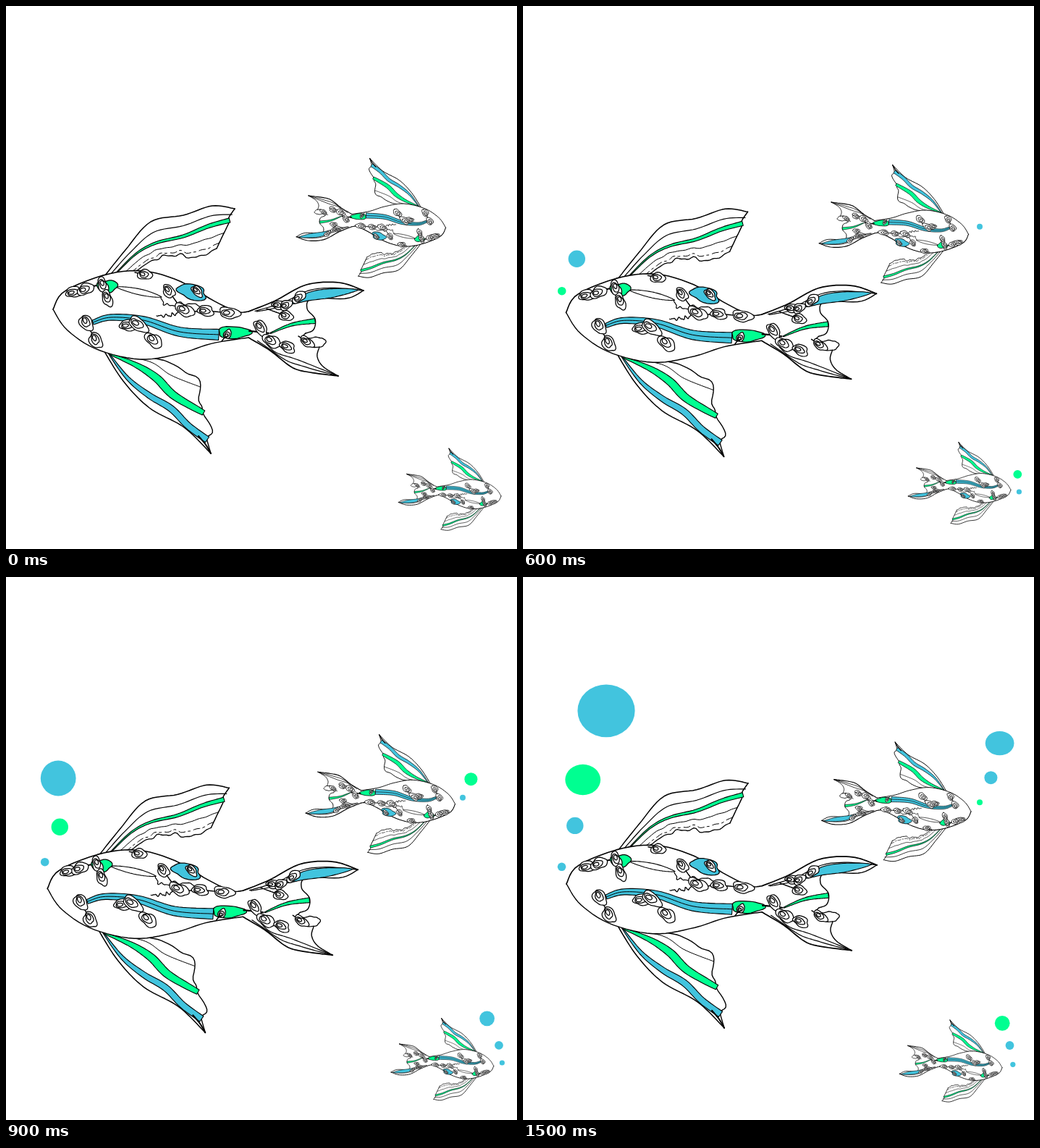
Write an HTML page that moves like this. It is 706 px wide and 750 px high and loops after 1.8 s.

```html
<!DOCTYPE html>
<html lang="en">
<head>
<meta charset="utf-8">
<title>Three fish</title>
<style>
  html, body { margin: 0; width: 100%; height: 100%; overflow: hidden; background: #fff; }
  svg { display: block; width: 706px; height: 750px; }
  path { stroke-width: calc(var(--w) * var(--bold, 1) * 1px); }
</style>
</head>
<body>
<svg id="stage" viewBox="0 0 706 750">
  <defs><g id="fish" stroke="#000" stroke-linecap="round" stroke-linejoin="round"></g></defs>
</svg>
<script>
const BLUE = '#42c4de', GREEN = '#00ff91', WHITE = '#fff';
const STEP = 300, COUNT = 6;
const { PI, sin, cos, min, max, floor, hypot } = Math;
const stage = document.getElementById('stage');
const fish = document.getElementById('fish');

function add(parent, tag, attrs) {
  const el = document.createElementNS('http://www.w3.org/2000/svg', tag);
  for (const key in attrs) el.setAttribute(key, attrs[key]);
  return parent.appendChild(el);
}

// Spline through a few key points, as a function of t in 0..1.
function curve(text) {
  const n = text.split(' ').map(Number), p = [];
  for (let i = 0; i < n.length; i += 2) p.push([n[i], n[i + 1]]);
  return t => {
    const u = t * (p.length - 1), i = min(floor(u), p.length - 2), s = u - i;
    const b = p[i], c = p[i + 1], a = p[i - 1] || b, d = p[i + 2] || c;
    return b.map((v, k) => v + s / 2 * (c[k] - a[k]
      + s * (2 * a[k] - 5 * v + 4 * c[k] - d[k] + s * (3 * (v - c[k]) + d[k] - a[k]))));
  };
}

function slope(f, t) {
  const [a, b] = f(max(0, t - .01)), [c, d] = f(min(1, t + .01));
  return [c - a, d - b];
}

// Shift a curve sideways by dist(t).
const offset = (f, dist) => t => {
  const [x, y] = f(t), [dx, dy] = slope(f, t), k = dist(t) / (hypot(dx, dy) || 1);
  return [x - dy * k, y + dx * k];
};
const mix = (f, g, k) => t => f(t).map((v, i) => v + (g(t)[i] - v) * k);
const ruffle = (f, size) => offset(f, t => size * sin(PI * t) * (sin(31 * t) + .6 * sin(53 * t)));
const trace = (f, n = 40) =>
  Array.from({ length: n + 1 }, (_, i) => f(i / n).map(v => v.toFixed(1)).join(' '));

const draw = (points, fill = 'none', width = 1.2, extra = {}) =>
  add(fish, 'path', { d: 'M' + points.join('L') + (fill === 'none' ? '' : 'Z'), fill, style: `--w:${width}`, ...extra });
const line = (f, width, extra) => draw(trace(f), 'none', width, extra);
const band = (f, half, fill) =>
  draw([...trace(offset(f, half)), ...trace(offset(f, t => -half(t))).reverse()], fill, 1.1);

// A soft lobed outline; the seed varies its lobes.
function blob(x, y, rx, ry, turn, fill, seed = x, lobes = .1) {
  draw(trace(t => {
    const a = t * 2 * PI, r = 1 + lobes * (sin(2 * a + seed) + sin(3 * a + 2 * seed) + .5 * sin(5 * a + seed));
    const u = cos(a) * r * rx, v = sin(a) * r * ry;
    return [x + u * cos(turn) - v * sin(turn), y + u * sin(turn) + v * cos(turn)];
  }, 28), fill, 1.25);
}

function petal(x, y, size, turn) {
  for (const [k, scale] of [1, .62, .32].entries()) {
    const back = k * size * .16;
    blob(x - back * cos(turn), y - back * sin(turn), size * scale, size * scale * .62, turn, WHITE, x + k, .1 - k * .03);
  }
}

// Petals spread along a stem; a single one sits at its end.
function garland(text, count, size) {
  const f = curve(text);
  line(f, 1.5);
  for (let i = 0; i < count; i++) {
    const t = count > 1 ? i / (count - 1) : 1, [dx, dy] = slope(f, t), [x, y] = f(t);
    petal(x, y, size * (1 + .12 * sin(x)), Math.atan2(dy, dx));
  }
}

function drawFins() {
  const top = curve('137 372 165 337 200 298 245 289 285 276 316 280');
  const green = curve('152 369 180 342 208 327 245 318 280 304 309 296');
  const frill = ruffle(curve('178 367 208 349 235 344 264 347 291 335'), 1.8);
  line(top, 1.5);
  line(mix(top, green, .5));
  line(mix(green, frill, .45), 1);
  line(mix(green, frill, .8), 1, { 'stroke-dasharray': '9 4 3 5' });
  line(frill, 1.3);
  line(curve('316 280 308 292 308 299 299 318 291 335'), 1.5);
  band(green, t => .5 + 2.6 * t, GREEN);

  line(curve('134 474 162 518 198 555 246 582 283 618'), 1.5);
  line(ruffle(curve('202 486 222 491 248 505 268 519 267 545 273 562 285 586 278 598 283 618'), 1), 1.4);
  line(curve('144 481 198 491 228 510 268 526'), 1);
  band(curve('142 480 168 514 198 538 228 556 252 580 278 599'), t => .5 + 4 * sin(PI * min(t * .8, .5)), BLUE);
  band(curve('142 480 180 496 208 514 232 538 273 562'), t => .5 + 5 * sin(PI * t * .8), GREEN);
  line(curve('266 594 276 606 283 618'), 2);
}

function drawTail() {
  const top = curve('335 422 372 407 415 385 460 382 494 393');
  const low = curve('335 458 365 476 395 499 420 506 459 511');
  const blue = curve('391 412 420 401 455 396 487 392');
  const rib = curve('360 467 374 479 404 489 459 511');
  line(top, 1.7);
  line(low, 1.7);
  line(mix(top, curve('350 421 391 412 425 396 494 393'), .6));
  line(curve('346 422 369 418 391 412'));
  line(rib);
  line(mix(low, rib, .5));
  line(curve('494 393 470 404 423 404 416 418 427 432 425 447 414 452'), 1.4);
  line(ruffle(curve('414 452 410 458 428 458 440 460 438 470 420 470 412 462'), .8), 1.3);
  line(curve('433 471 430 484 438 498 459 511'), 1.4);
  band(blue, t => 6.5 * sin(PI * t), BLUE);
  band(curve('365 452 395 440 427 435'), t => .5 + 3 * t, GREEN);
}

function drawBody() {
  const back = curve('65 419 81 394 138 371 190 366 240 380 285 406 318 422 335 422');
  const belly = curve('335 458 285 466 240 480 185 488 125 474 84 447 65 419');
  draw([...trace(back), ...trace(belly)], WHITE, 0);
  line(back, 1.6);
  line(belly, 1.4);

  const stripe = curve('120 437 145 430 190 434 240 450 294 454');
  band(stripe, t => 3 + 4.5 * t, BLUE);
  line(stripe, 1);
  blob(315, 451, 21, 9, -.05, GREEN);
  line(curve('336 449 348 450 363 452'), 2.2);

  band(curve('152 388 185 395 215 402'), t => 4 * sin(PI * t), WHITE);
  line(curve('105 390 127 386 140 388'), 2);
  line(ruffle(curve('214 403 222 413 250 411 278 416'), 2), 1.2);
  line(ruffle(curve('208 428 228 427 244 421'), 2), 1.3);
  blob(140, 387, 13, 9, 0, GREEN);
  blob(257, 395, 21, 10, .2, BLUE);
}

function drawPetals() {
  garland('94 395 110 391', 2, 12);
  garland('134 386 140 404', 2, 10);
  garland('178 368 192 371', 1, 11);
  garland('225 394 247 420 276 421 309 424', 4, 12);
  garland('258 389 264 394', 1, 9);
  garland('169 441 183 440 204 462', 3, 13);
  garland('111 438 124 462', 2, 14);
  garland('298 463 306 453', 1, 8);
  garland('376 413 387 413 405 402', 3, 10);
  garland('360 418 387 428', 1, 11);
  garland('352 445 367 463 389 471', 3, 12);
  garland('404 456 416 464', 1, 9);
}
[drawFins, drawTail, drawBody, drawPetals].forEach(part => part());

// Anchor, scale, line weight and the drift after each step.
const swimmers = [
  { x: 0, y: 0, s: 1, bold: 1, drift: [[0, 0], [-11, 7.5], [-5.5, 4.3], [-7.7, 11.3], [-5, 4.8]] },
  { x: 638.8, y: 507.8, s: -.481, bold: 1.35, drift: [[0, 0], [7, 5.8], [8, 9], [13, 7.3], [11.5, 17.6]] },
  { x: 705.5, y: 815.4, s: -.3305, bold: 1.6, drift: [[0, 0], [-7.7, -1.5], [-10, -8.5], [-10.2, -1.5], [-22, .8]] }
];
for (const w of swimmers) w.el = add(stage, 'use', { href: '#fish', style: `--bold:${w.bold}` });

// Radius, steps shown in green, and centres keyed by the step they begin at.
const bubbles = [
  { r: 5.8, green: [2], at: { 1: [53.7, 393.7], 4: [49.3, 396.2], 5: [53.5, 400.3] } },
  { r: 11.7, green: [3], at: { 2: [74.3, 349.3], 3: [74.3, 345.2], 4: [69.7, 347.7], 5: [71.8, 343.4] } },
  { r: 24.4, green: [5], at: { 3: [72.2, 278], 4: [78.5, 288.5], 5: [82.7, 280] } },
  { r: 39.6, green: [4], at: { 4: [112.7, 184], 5: [115, 184.8] } },
  { r: 4, green: [5], at: { 2: [631, 304.8], 4: [626.7, 307.3], 5: [631, 311.3] } },
  { r: 9, green: [3], at: { 3: [642.4, 279.2], 5: [646.4, 277.2] } },
  { r: 19.9, green: [], at: { 4: [660.8, 230.5], 5: [658.6, 229.6] } },
  { r: 3.6, green: [], at: { 1: [685.4, 671], 4: [681, 673.3], 5: [676.8, 673.3] } },
  { r: 5.9, green: [2, 4], at: { 2: [683.3, 646.8], 3: [681, 646.8], 4: [676.7, 645], 5: [672.5, 647] } },
  { r: 10.4, green: [5], at: { 3: [664.6, 609.8], 4: [658, 614.3], 5: [662.2, 616.3] } }
];
for (const b of bubbles) b.el = add(stage, 'ellipse', { rx: b.r });

function pose(step) {
  for (const w of swimmers) {
    const [dx, dy] = w.drift[min(step, w.drift.length - 1)];
    w.el.setAttribute('transform', `translate(${w.x + dx} ${w.y + dy}) scale(${w.s})`);
  }
  for (const b of bubbles) {
    const key = Object.keys(b.at).filter(k => k <= step).pop();
    b.el.setAttribute('visibility', key ? 'visible' : 'hidden');
    if (!key) continue;
    const squash = step === COUNT - 1 && b.r > 15 ? 3.2 : 0;
    b.el.setAttribute('cx', b.at[key][0]);
    b.el.setAttribute('cy', b.at[key][1]);
    b.el.setAttribute('ry', b.r - squash);
    b.el.setAttribute('fill', b.green.includes(step) ? GREEN : BLUE);
  }
}

const start = performance.now();
function tick() {
  pose(floor(max(0, performance.now() - start) / STEP) % COUNT);
  requestAnimationFrame(tick);
}
tick();
</script>
</body>
</html>
```
